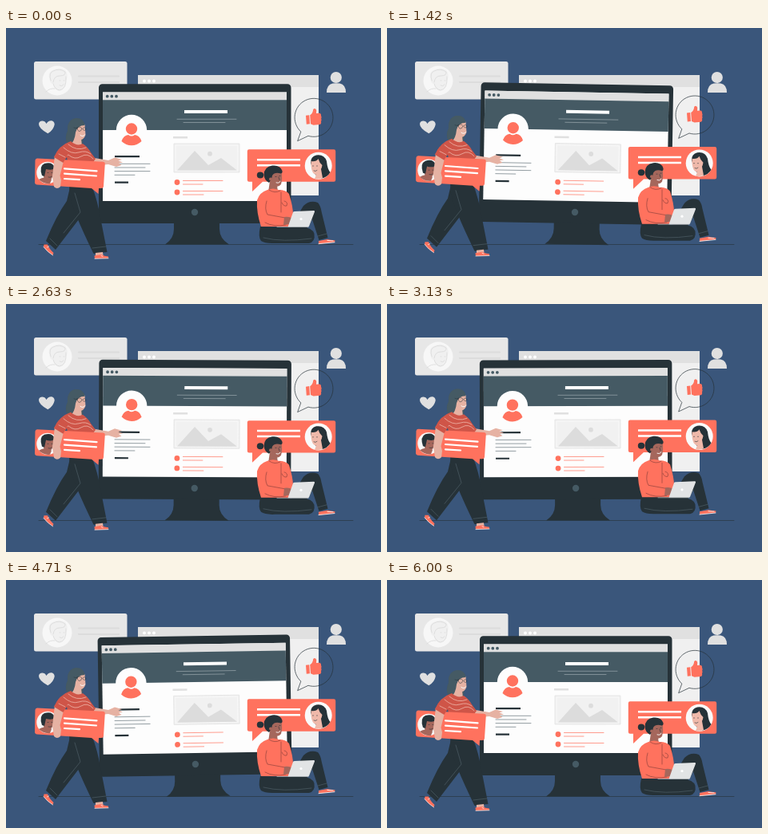
These frames come from a looping animation (469 by 311 pixels, 6040 ms). An HTML page:

```html
<!DOCTYPE html>
<html lang="en">
<head>
<meta charset="utf-8">
<title>Online profile</title>
<style>
  html, body { margin: 0; width: 100%; height: 100%; overflow: hidden; background: #3a567b; }
  svg { display: block; width: 100vw; height: 100vh; }
  .ink { fill: #263238; }
  .slate { fill: #455a64; }
  .coral { fill: #ff725e; }
  .rust { fill: #cf5548; }
  .grey { fill: #e0e0e0; }
  .white { fill: #fff; }
  .skin { fill: #e6b2a3; }
  .brown { fill: #a5675c; }
  .line { fill: none; stroke-linecap: round; stroke-linejoin: round; }
</style>
</head>
<body>
<svg viewBox="0 0 469 311" preserveAspectRatio="none">
  <rect width="469" height="311" fill="#3a567b"/>

  <g id="backdrop">
    <rect x="35" y="42" width="116.500" height="47.500" rx="2.500" fill="#e7e7e7"/>
    <circle cx="64" cy="66" r="18.500" fill="#f7f7f7"/>
    <path d="M55 66Q51 56 58 53Q66 48 74 53Q79 59 75 66Q74 78 66 79Q60 77 59 70Q55 70 55 66Z" fill="#f0f0f0"/>
    <path class="line" d="M56 66Q53 56 59 54Q67 50 74 55Q75 60 67 60Q60 60 59 68M75 61Q76 77 67 78Q61 77 59 70M50 80Q55 75 61 76M67 66h1M72 66h1M67 72Q70 74 72 71" stroke="#d6d6d6" stroke-width=".7"/>
    <path class="line" d="M91 60.500H141M91 68H141" stroke="#dcdcdc" stroke-width="2.200"/>
    <rect x="165" y="59" width="226" height="151" fill="#f0f0f0"/>
    <rect class="grey" x="165" y="59" width="226" height="15"/>
    <g class="white">
      <circle cx="173" cy="66.500" r="1.900"/><circle cx="179" cy="66.500" r="1.900"/><circle cx="185" cy="66.500" r="1.900"/>
    </g>
    <path class="grey" d="M52.300 132.300Q41 126 41 120.500C41 115.500 48.500 115 50.500 120C53 114.500 61 115 60.700 121Q59.500 128 52.300 132.300Z"/>
    <circle class="grey" cx="412.800" cy="62" r="7.100"/>
    <path class="grey" d="M401 81Q401 71 408.500 69.500Q413 68.800 417.500 69.500Q425 71 425 81Z"/>
    <path class="line" d="M41 271.500H434" stroke="#263238" stroke-width=".6"/>
  </g>

  <g id="monitor">
    <path class="ink" d="M210 244H267V252Q267 264 279 271.500H199Q210 264 210 252Z"/>
    <rect class="ink" x="116" y="70.200" width="240.500" height="174.800" rx="4.500"/>
    <rect x="121" y="80.500" width="230" height="136.500" fill="#fdfdfd"/>
    <rect class="grey" x="121" y="80.500" width="230" height="10"/>
    <rect class="slate" x="121" y="90.300" width="230" height="37.700"/>
    <g class="slate">
      <circle cx="126.700" cy="85.700" r="1.900"/><circle cx="132.300" cy="85.700" r="1.900"/><circle cx="138" cy="85.700" r="1.900"/>
      <circle cx="236" cy="231" r="4.200"/>
    </g>
    <rect class="white" x="223" y="103" width="54" height="4"/>
    <path class="line" d="M214 114.300H288M222 118.500H274" stroke="#aab6bb" stroke-width=".6"/>
    <circle cx="157" cy="128" r="19.200" fill="#fdfdfd"/>
    <circle class="coral" cx="157" cy="126.500" r="7.200"/>
    <path class="coral" d="M144.500 142Q147 134.500 153 134Q157 137 161 134Q167 134.500 169.500 142Q164 147.300 157 147.300Q150 147.300 144.500 142Z"/>
    <path class="ink" d="M136 160h31v2.200h-31ZM136 192.500h17v2.200h-17Z"/>
    <path class="line" d="M136 170.300H180M136 175H174M136 179.600H180M136 184.300H161" stroke="#66747b" stroke-width=".7"/>
    <rect class="grey" x="209" y="136" width="18" height="2.500"/>
    <rect x="210" y="145" width="82" height="36" fill="#f1f1f1" stroke="#e2e2e2" stroke-width=".8"/>
    <rect x="212" y="147" width="78" height="32" fill="none" stroke="#fafafa" stroke-width=".8"/>
    <path fill="#dcdcdc" d="M214 178.500L236 154L253 172L269 163L289 178.500Z"/>
    <circle fill="#dcdcdc" cx="255" cy="157.700" r="2.900"/>
    <circle class="coral" cx="214" cy="193.500" r="3.400"/><circle class="coral" cx="214" cy="206" r="3.400"/>
    <path class="line" d="M221.500 191.500H271M221.500 196H246M221.500 204.500H271M221.500 209H247" stroke="#ff725e" stroke-width=".7"/>
  </g>

  <g id="floating">
    <g id="like">
      <path class="line" d="M368.500 129.800A24 24 0 1 1 378 135.300L365 141.500Z" stroke="#263238" stroke-width=".7"/>
      <path class="coral" d="M375 109.800L379.200 109.200L380 120.300L375.800 120.800ZM380.200 109.300Q384 107 384.200 102Q386.500 99.500 388.200 103L388 107L392.500 106.700Q394.500 107.500 394 109.700Q395 111.800 394.200 113.500Q395 115.500 394 117.200Q394.800 120 392.500 121L384.500 121.700L381 120.200Z"/>
    </g>

    <g id="reply">
      <path class="coral" d="M304 152.300H410Q412.200 152.300 412.200 154.500V190.500Q412.200 192.700 410 192.700H321L308 205V192.700H304Q301.800 192.700 301.800 190.500V154.500Q301.800 152.300 304 152.300Z"/>
      <path class="white" d="M314 164h54v2.500h-54ZM314 171h54v2.500h-54Z"/>
      <circle cx="390.700" cy="172.700" r="17" fill="#fafafa"/>
      <path class="ink" d="M381 169Q381 161 388 159.500Q398 158 401 167Q402 177 405.500 181Q402 187 395 188.500Q386 186 384 178Z"/>
      <path fill="#efb9aa" d="M381.500 167Q388 168 390.500 164Q392 169 395.500 172Q395 175 394 177L396 188Q391 190 386 189L388 184Q381 183 381.500 167Z"/>
      <path class="line" d="M383.500 173h1M388.500 173h1M385 179Q387 180.500 389 178.500" stroke="#263238" stroke-width=".6"/>
    </g>

    <g id="sitting">
      <path class="ink" d="M356 249L372 223Q380 215 390 219Q393.500 223 394.500 230L402.500 263L391.500 266L383 240L372 258Z"/>
      <path class="line" d="M383 240L378 250M390 261L401 258" stroke="#54656d" stroke-width=".6"/>
      <path class="ink" d="M318 249Q315 262 319 267Q324 270.500 336 270H379Q387 268 385.500 258Q383 250 370 250Z"/>
      <path class="line" d="M322 263Q345 269 382 264" stroke="#54656d" stroke-width=".6"/>
      <path class="coral" d="M391 267L402 265Q406 266 411.500 266.300L411 268.500L391 270.800Z"/>
      <path class="line" d="M391 270.700L411 268.700M402 266.500L409 266.800" stroke="#fff" stroke-width=".8"/>
      <ellipse class="ink" cx="318" cy="184.500" rx="4.200" ry="4"/>
      <path class="brown" d="M330 192L339 197L340 206L328 206Z"/>
      <path class="brown" d="M329 182Q336 174 344.500 180Q346 189 344 196Q341 200 336 198Q330 196 329 182Z"/>
      <path class="ink" d="M322.500 184Q323 174 333 172.500Q343 171.500 345.500 179Q346 182 344 182.500Q336 180 333 185Q332 191 329 194Q323 191 322.500 184Z"/>
      <circle class="brown" cx="331" cy="189.500" r="2"/>
      <path class="line" d="M337 186.500h1M342 185.500h1M341 187l1 3.500" stroke="#263238" stroke-width=".6"/>
      <path class="line" d="M338 194Q341 195.500 343 192.500" stroke="#fff" stroke-width=".9"/>
      <path class="coral" d="M327 203Q334 200 341 203Q350 203 354 208Q359 224 359 234L354 249H319Q313 231 314 216Q317 206 327 203Z"/>
      <path class="line" d="M329 203Q336 208 343 204M344 206V231M348 217Q353 218 351 223Q347 224 345 219M326 217Q323 227 327 234L349 238M324 244Q335 250 350 247" stroke="#7d3b38" stroke-width=".6"/>
      <path class="brown" d="M348 237Q355 236 358 239L355 246L347 247Z"/>
      <path fill="#e2e4e5" d="M359 231Q359.500 230 361 230L385 229Q386.500 229 386 230.500L379 248.500Q378.500 249.500 377 249.500L352.500 249.500Z"/>
      <path class="line" d="M339 249.500H378" stroke="#b9bfc2" stroke-width=".7"/>
      <circle class="white" cx="369" cy="239.500" r="1.600"/>
    </g>

    <g id="walking">
      <path class="ink" d="M80 200L99 206Q98 228 91 240L62 278L50 267Q63 235 76 217Z"/>
      <path class="ink" d="M79 197H107Q115 218 118.500 240L126.500 281L109.500 283Q96 255 89 238Q79 215 79 197Z"/>
      <path class="line" d="M86 207L93 231L72 257M108 276L125 274M55 264L64 273" stroke="#54656d" stroke-width=".6"/>
      <path class="coral" d="M47.500 271.500L52 271.500Q54 277 59.500 282L58.500 285Q51 280 47 274.500Z"/>
      <path class="skin" d="M112 282L121 281L121.500 285L112 286Z"/>
      <path class="coral" d="M110.500 285.500L119 284Q123 286 128 286.500V288.800L111 289.300Z"/>
      <path class="line" d="M47 274.500Q52 281 58.500 285M111 289.300L128 288.800M119 285.500l2 1M51.500 275l2-1" stroke="#fff" stroke-width=".7"/>

      <path class="slate" d="M78 145Q72 138 77 129Q76 116 86 113.500Q96 112 98.500 121L96 145Q88 151 78 145Z"/>
      <path class="skin" d="M85 132L94 138L95 148Q88 150 82 146Z"/>
      <path class="skin" d="M85 123Q91 117 98.500 121L99.500 134Q97 141 92 140Q85 139 85 123Z"/>
      <path class="slate" d="M98.500 122Q89 122 87 131Q86 142 80 147Q72 143 77 131Q76 116 86 113.500Q97 112 98.500 122Z"/>
      <path class="line" d="M89 125Q93 123 95 126Q94 130 91 129.500Q89 128 89 125ZM96 126Q99 123 100 127Q98 130 96 127ZM85 125L89 126" stroke="#263238" stroke-width=".5"/>
      <path class="line" d="M93 134.500Q96 137 98.500 134" stroke="#fff"/>

      <path class="skin" d="M105 162L128 166L136 162.500L145 165L140.500 166.500L146 168.500L141 169.500L144.500 172L138 174L128 171L106 173Z"/>
      <path class="rust" d="M81 142Q89 149 96 145Q103 150 106 156L112 164L107 171L78 172L76 162L71 169L60 162Q66 147 81 142Z"/>
      <path class="line" d="M78 146Q88 155 100 150M72 150Q82 159 91 156T106 158M66 157Q73 163 78 159Q86 166 94 161T109 164" stroke="#efb7aa" stroke-width=".8"/>

      <path class="coral" d="M39 163.500L121.500 167.700Q124 168 123.800 170.200L122 198.500Q121.800 201 119 201L116 201L115.500 208L107 201L39 196.500Q36 196.200 36 193.500L36.500 166Q36.700 163.500 39 163.500Z"/>
      <circle cx="52" cy="181.500" r="13.700" fill="#f7f7f7"/>
      <path class="brown" d="M48 177H59Q60 187 55 191H48Q46 184 48 177ZM41 190Q48 185 57 190L55 195Q47 196 41 190Z"/>
      <path class="ink" d="M45 185Q41 173 48 170Q58 167 61 175Q59 179 50 177L48 186Z"/>
      <path class="line" d="M52 181.500h1M57 181.500h1M53 187Q55 188 57 186.500" stroke="#263238" stroke-width=".6"/>
      <path class="line" d="M73 176.300L113.500 179.300M73 182.700L113 185.500M73 189L92 190.200" stroke="#fff" stroke-width="2.200" stroke-linecap="butt"/>
      <path class="skin" d="M61 160L72 167L67.500 185L69 191L68 199Q64 203 60 199L58 186Z"/>
      <path class="rust" d="M66 152L77 159L71.500 169L60 162Z"/>
      <path class="line" d="M66 158L74 162" stroke="#efb7aa" stroke-width=".8"/>
    </g>
  </g>
</svg>
<script>
  const LOOP = 6040, PERIOD = 6000, LIFT = 7, TILT = 1;
  const monitor = document.getElementById('monitor');
  const floating = document.getElementById('floating');

  // Triangle wave: 0 at the start, 1 at half a cycle, 0 at the end.
  const triangle = phase => 1 - Math.abs(1 - 2 * (phase % 1));

  function draw(time) {
    const phase = (time % LOOP) / PERIOD;
    const lift = LIFT * triangle(phase);
    const angle = TILT * (2 * triangle(phase + 0.25) - 1);
    floating.setAttribute('transform', `translate(0 ${-lift})`);
    monitor.setAttribute('transform', `rotate(${angle} 236 170)`);
  }

  const start = performance.now();
  function tick() {
    draw(performance.now() - start);
    requestAnimationFrame(tick);
  }
  draw(0);
  requestAnimationFrame(tick);
</script>
</body>
</html>
```
